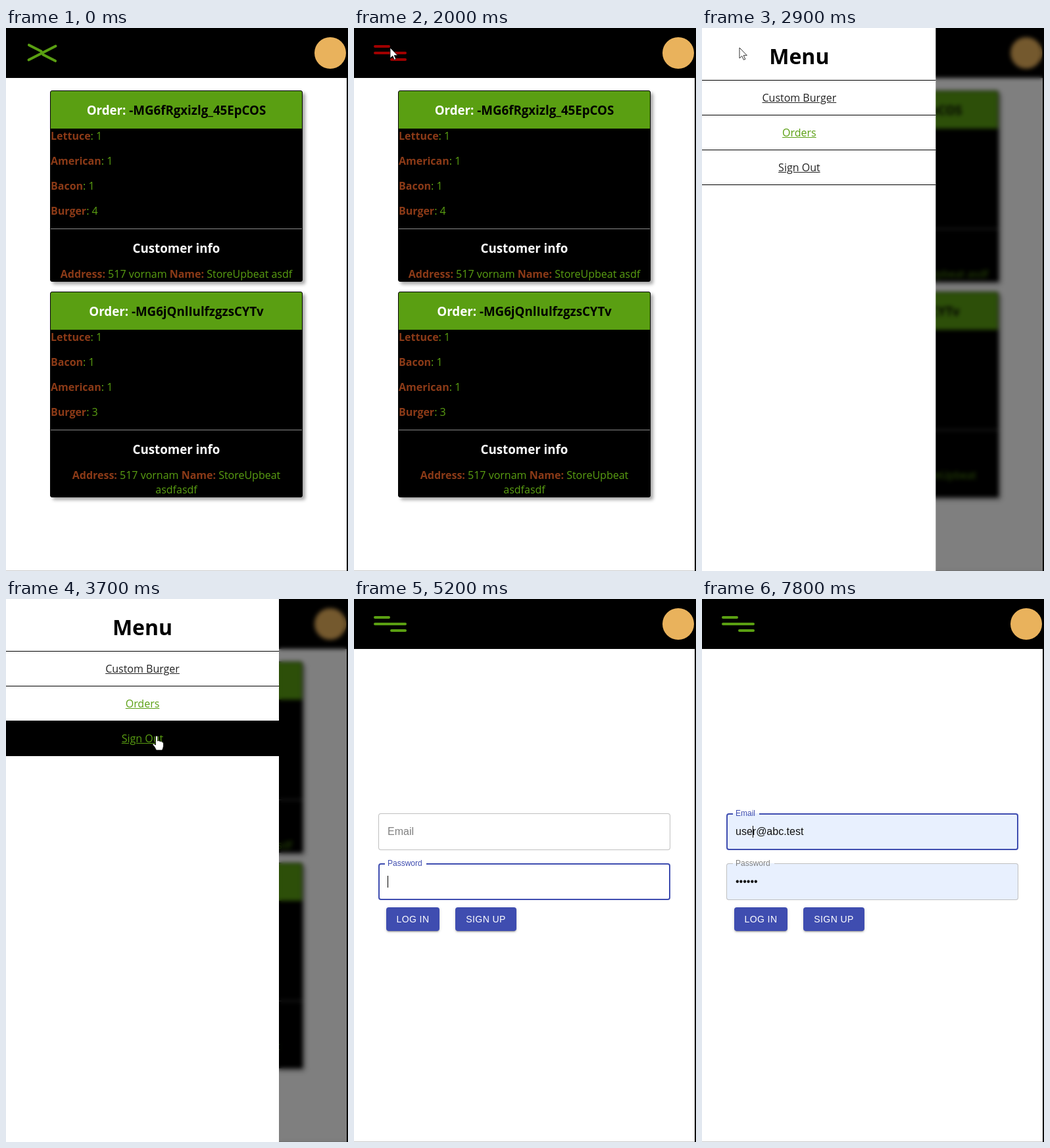
An HTML page for the animation above (8000 ms loop, 520 px wide and 826 px high).

```html
<!DOCTYPE html>
<html lang="en">
<head>
<meta charset="utf-8">
<title>Burger orders</title>
<style>
  :root { --green: #5a9f12; --rust: #8b3a17; --blue: #3f4db0; }
  * { box-sizing: border-box; }
  html, body { margin: 0; width: 520px; height: 826px; overflow: hidden; background: #fff; }
  body { position: relative; font: 16px/22px "Open Sans", sans-serif; }
  .abs, header, #icon, #logo, .card, .field, .field *, .button, #overlay, #drawer, .pointer { position: absolute; }
  #page { inset: 0; }
  header { width: 520px; height: 75.5px; background: #000; }
  #icon { left: 0; top: 0; fill: none; stroke-width: 4; stroke-linecap: round; }
  #logo { left: 469px; top: 14px; width: 48px; height: 48px; border-radius: 50%; background: #e9b25c; }
  #edge { left: 518px; top: 0; width: 2px; height: 826px; background: #000; }
  #foot { left: 0; top: 825px; width: 518px; height: 1px; background: #ccc; }

  .card { left: 67px; width: 384px; border: 1px solid #000; border-radius: 3px; overflow: hidden;
    background: #000; color: var(--green); box-shadow: 4px 4px 5px #aaa; white-space: nowrap; }
  .card h3 { margin: 0; padding: 16px 0 15.5px; font-size: 18.72px; line-height: 25.5px; text-align: center; color: #fff; }
  .card .title { background: var(--green); }
  .title span { color: #000; }
  .card p { margin: 0 0 16px; }
  .card b { color: var(--rust); }
  .card hr { margin: 0; border: 0; height: 1px; background: #8a8a8a; }
  .card .info { margin: 0; text-align: center; }

  #login { font: 16px/20px "Liberation Sans", Arial, sans-serif; }
  .field { left: 37px; width: 444px; height: 56px; border-radius: 4px; }
  .field label, .field span { left: 14px; top: 18px; white-space: nowrap; }
  .field label { transform-origin: left center; }
  .field span { color: #111; }
  .notch { left: 10px; top: 0; height: 2px; }
  .caret { top: 19px; width: 1px; height: 18px; background: #000; }
  .button { top: 468.5px; height: 36px; border-radius: 4px; background: var(--blue); color: #fff;
    font-size: 14px; line-height: 36px; letter-spacing: .4px; text-align: center;
    box-shadow: 0 3px 1px -2px #0003, 0 2px 2px #0002, 0 1px 5px #0002; }

  #overlay { left: 0; top: 0; width: 518px; height: 826px; }
  #drawer { left: 0; top: 0; width: 415px; height: 826px; background: #fff; text-align: center; }
  #drawer h1 { margin: 0; height: 80px; border-bottom: 1px solid #000; font-size: 32px; line-height: 86px; color: #000; }
  #drawer div { height: 53px; border-bottom: 1px solid #000; line-height: 52px; text-decoration: underline; }
  .pointer { left: 0; top: 0; overflow: visible; fill: #fff; stroke: #000; stroke-width: .8; stroke-linejoin: round; }
</style>
</head>
<body>
<div id="page" class="abs">
  <header></header>
  <svg id="icon" width="110" height="75">
    <path d="M32 28H53"/><path d="M32 38H78"/><path d="M57 48H78"/>
  </svg>
  <div id="logo"></div>
  <div id="orders"></div>
  <div id="login">
    <div class="button" style="left:49px;width:81px">LOG IN</div>
    <div class="button" style="left:154px;width:93px">SIGN UP</div>
  </div>
  <div id="foot" class="abs"></div>
</div>
<div id="overlay"></div>
<nav id="drawer"><h1>Menu</h1><div>Custom Burger</div><div>Orders</div><div>Sign Out</div></nav>
<svg id="arrow" class="pointer" width="14" height="22"><path d="M0 0V16L3.8 12.6L6.4 18.4L8.8 17.3L6.2 11.7H11.3Z"/></svg>
<svg id="hand" class="pointer" width="18" height="24">
  <path d="M-1.6 1Q0-1 1.6 1V8Q3.5 6.5 5 8.5Q7 7.5 8 9.5Q10.4 9 10.4 12V16Q10 19 8.5 22H-.5Q-2.5 17-6 13.5Q-5.5 10.5-1.6 14Z"/>
</svg>
<div id="edge" class="abs"></div>

<script>
const LOOP = 8000;
const $ = id => document.getElementById(id);
const GREEN = '#5a9f12', BLUE = '#3f4db0', TINT = '#e8f0fe';

const ramp = (t, from, to) => Math.min(1, Math.max(0, (t - from) / (to - from)));
const easeOut = x => 1 - (1 - x) ** 3;
const easeInOut = x => x < .5 ? 4 * x ** 3 : 1 - 4 * (1 - x) ** 3;
const pulse = (t, a, b, c, d) => easeInOut(ramp(t, a, b)) - easeInOut(ramp(t, c, d));
const show = (el, on) => el.style.visibility = on ? 'visible' : 'hidden';

function addCard(top, id, items, address, name) {
  const list = items.map(([item, count]) => `<p><b>${item}</b>: ${count}</p>`).join('');
  $('orders').insertAdjacentHTML('beforeend', `<div class="card" style="top:${top}px">
    <h3 class="title">Order: <span>${id}</span></h3>${list}<hr><h3>Customer info</h3>
    <p class="info"><b>Address:</b> ${address} <b>Name:</b> ${name}</p></div>`);
}
addCard(95, '-MG6fRgxizlg_45EpCOS',
  [['Lettuce', 1], ['American', 1], ['Bacon', 1], ['Burger', 4]], '517 vornam', 'StoreUpbeat asdf');
addCard(401, '-MG6jQnlIulfzgzsCYTv',
  [['Lettuce', 1], ['Bacon', 1], ['American', 1], ['Burger', 3]], '517 vornam', 'StoreUpbeat<br>asdfasdf');

function addField(top, name, value) {
  const el = document.createElement('div');
  el.className = 'field';
  el.style.top = top + 'px';
  el.innerHTML = `<div class="notch"></div><label>${name}</label><span>${value}</span><div class="caret"></div>`;
  $('login').append(el);
  const [notch, label, text, caret] = el.children;
  return ({ float, focused, filled, caretX }) => {
    el.style.background = filled ? TINT : '#fff';
    el.style.boxShadow = focused ? `inset 0 0 0 2px ${BLUE}` : 'inset 0 0 0 1px #c0c0c0';
    notch.style.background = filled ? TINT : '#fff';
    notch.style.width = float * (label.offsetWidth * .75 + 10) + 'px';
    label.style.transform = `translateY(${-28 * float}px) scale(${1 - .25 * float})`;
    label.style.color = focused ? BLUE : '#808080';
    text.style.display = filled ? '' : 'none';
    caret.style.display = caretX ? '' : 'none';
    caret.style.left = caretX + 'px';
  };
}
const drawEmail = addField(326, 'Email', 'user@abc.test');
const drawPassword = addField(402, 'Password', '••••••');

// Pointer stops: time, x, y
const stops = [[650, 120, 110], [900, 55, 25], [1500, 55, 30], [2500, 55, 30], [2900, 57, 30],
  [3100, 57, 30], [3600, 229, 208], [4500, 229, 208], [4950, 150, 400]];
function pointerAt(t) {
  const i = Math.max(1, stops.findIndex(s => s[0] > t));
  const [a, b] = [stops[i - 1], stops[i]];
  const k = easeInOut(ramp(t, a[0], b[0]));
  return [a[1] + (b[1] - a[1]) * k, a[2] + (b[2] - a[2]) * k];
}

function drawIcon(x, red) {
  const [top, middle, bottom] = $('icon').children;
  $('icon').style.stroke = red ? '#a00000' : GREEN;
  const angle = 45 * x;
  top.setAttribute('transform', `translate(${3 * x} ${4.5 * x}) rotate(${angle} 42.5 28)`);
  middle.setAttribute('transform', `rotate(${-angle} 55 38)`);
  bottom.setAttribute('transform', `translate(${-3 * x} ${-4.5 * x}) rotate(${angle} 67.5 48)`);
}

function render(t) {
  const signedOut = t >= 4050;
  show($('orders'), !signedOut);
  show($('login'), signedOut);

  const cross = t < 1000 ? .6 * (1 - easeOut(ramp(t, 50, 400))) : pulse(t, 2700, 2950, 4450, 4800);
  drawIcon(cross, t > 1950 && t < 4400);

  const dim = ramp(t, 2000, 2350) - ramp(t, 4150, 4450);
  show($('overlay'), dim > 0);
  $('overlay').style.background = `rgba(0,0,0,${dim / 2})`;
  $('overlay').style.backdropFilter = `blur(${3 * dim}px)`;

  const open = pulse(t, 2700, 3000, 4000, 4300);
  show($('drawer'), open > 0);
  $('drawer').style.transform = `translateX(${415 * (open - 1)}px)`;

  const visible = t >= 650 && t < 4950;
  const [x, y] = visible ? pointerAt(t) : [0, 0];
  const hovered = open === 1 ? Math.floor((y - 80) / 53) : -1;
  [...$('drawer').querySelectorAll('div')].forEach((row, i) => {
    row.style.background = i === hovered ? '#000' : '';
    row.style.color = i === hovered || i === 1 ? GREEN : '#222';
  });
  const onLink = hovered === 2 && x > 175;
  for (const [id, on] of [['arrow', !onLink], ['hand', onLink]]) {
    show($(id), visible && on);
    $(id).style.transform = `translate(${x}px,${y}px)`;
  }

  const filled = t >= 6800;
  const onPassword = t >= 5000 && t < 6200, onEmail = t >= 6200;
  const blink = (t - 5000) % 1000 < 500;
  drawEmail({
    float: easeOut(ramp(t, 6200, 6400)), focused: onEmail, filled,
    caretX: filled ? (t >= 7600 ? 40 : 0) : onEmail && blink ? 14 : 0
  });
  drawPassword({
    float: easeOut(ramp(t, 5000, 5200)) - easeOut(ramp(t, 6200, 6400)) + easeOut(ramp(t, 6800, 7000)),
    focused: onPassword, filled, caretX: onPassword && blink ? 14 : 0
  });
}

function tick() {
  render(performance.now() % LOOP);
  requestAnimationFrame(tick);
}
tick();
</script>
</body>
</html>
```
